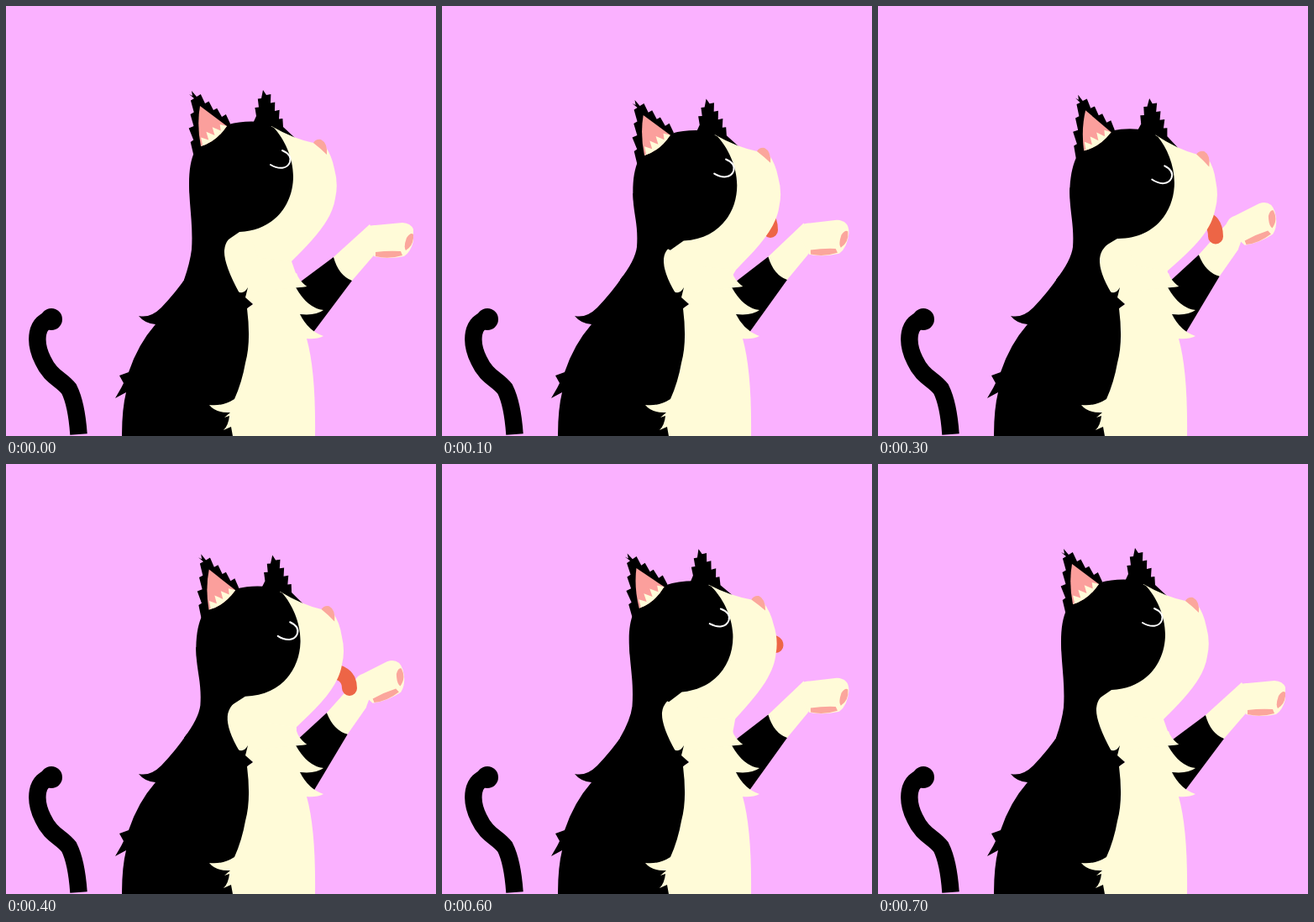
Write an HTML page that moves like this. It is 512x512 px and loops after 800 ms.

```html
<!DOCTYPE html>
<html lang="en">
<head>
<meta charset="utf-8">
<title>Cat licking its paw</title>
<style>
  html, body { margin: 0; width: 100%; height: 100%; overflow: hidden; background: #fab1ff; }
  svg { display: block; width: 100%; height: 100%; }
  .cream { fill: #fffbd8; }
  .pink { fill: #fba69c; }
  .line { fill: none; stroke-linecap: round; }
</style>
</head>
<body>
<svg viewBox="0 0 512 512">
  <defs>
    <clipPath id="edge"><path d="M0,0H485V512H0Z"/></clipPath>
  </defs>
  <rect width="512" height="512" fill="#fab1ff"/>

  <path fill="none" stroke="#000" stroke-width="20.5"
    d="M86.5,510 Q84,474 75,456 C66,444 53,442 44,422 C33,400 35,374 56,373"/>
  <circle cx="54" cy="373" r="13"/>

  <g clip-path="url(#edge)">
    <g id="arm">
      <path d="M338,338 L355,325 390,299 412,327 364,391 340,380Z"/>
      <path class="cream" d="M390,299 L433,260 446,280 437,298 412,327 Q396,321 390,299Z"/>
      <g id="paw">
        <path class="cream" d="M424,270 Q431,260 440,261 L472,258 Q487,259 486,274 Q484,291 474,298 Q456,302 438,298Z"/>
        <path class="pink" d="M440,293 Q455,291 470,292 L472,297 Q455,302 440,298Z"/>
        <path class="pink" d="M477,276 Q482,269 485,272 Q486,285 476,291 Q473,287 477,276Z"/>
      </g>
    </g>
  </g>

  <path d="M138,512 Q138,480 143,460 L130,467 137,455 140,449 135,440 146,436 Q157,403 178,379
    Q165,378 158,369 Q172,372 185,359 Q203,340 215,322 L280,335 300,400 290,512Z"/>
  <path id="neck"/>
  <path class="cream" d="M278,342 L294,355 287,360 Q292,400 285,425 Q281,448 272,468 Q258,477 242,475
    Q250,485 267,484 L260,490 266,488 Q265,499 259,505 L268,501 270,512 H368 Q369,435 358,396
    Q370,397 378,393 Q360,387 350,367 Q369,369 378,362 Q359,360 345,335 L358,334 Q348,326 346,318Z"/>
  <path id="throat" class="cream"/>
  <path d="M276,340 Q283,344 288,335 L285,347 294,355 287,360 278,355Z"/>
  <path id="tongue" class="line" stroke="#ed6546" stroke-width="18"/>

  <g id="head">
    <path id="farEar"/>
    <path class="cream" d="M316,143 Q342,158 366,163 L380,167 Q388,178 391,194 Q396,212 392,229
      C388,256 365,279 340,304 L300,300 280,240Z"/>
    <path class="pink" d="M366,163 Q369,158 375,159 Q383,163 382,177 Q375,170 366,163Z"/>
    <path d="M218,212 C218,195 220,183 225,172 Q239,148 265,141 Q282,136 305,138 L319,145
      C331,158 342,180 342,203 C342,235 321,267 278,269 L262,280 240,268 225,245 Q218,228 218,212Z"/>
    <path id="nearEar"/>
    <path fill="#fb9f9c" d="M231,119 L263,143 Q250,162 232,167 Q227,142 231,119Z"/>
    <path id="earTuft" class="cream"/>
    <path id="eye" class="line" stroke="#fff" stroke-width="2"
      d="M315,189 C325,195 335,194 338,186 C340,180 336,175 329,172"/>
  </g>
</svg>
<script>
  const STEP = 100, FRAMES = 8;
  const CENTER = [290, 205];
  const $ = id => document.getElementById(id);
  const set = (id, name, value) => $(id).setAttribute(name, value);

  let seed = 7;
  const random = () => (seed = seed * 16807 % 2147483647) / 2147483647;

  // Jagged edge from a to b; spikes stand on the left and lean along the edge
  function fur([ax, ay], [bx, by], count, height, lean) {
    const dx = bx - ax, dy = by - ay, len = Math.hypot(dx, dy);
    const at = (t, h) => [ax + dx * t + dy / len * h, ay + dy * t - dx / len * h];
    let path = `L${ax},${ay}`;
    for (let i = 0; i < count; i++) {
      const h = height * (.7 + .5 * random());
      path += ` L${at((i + lean) / count, h)} ${at((i + 1) / count, 0)}`;
    }
    return path;
  }

  set('nearEar', 'd', 'M225,180 ' + fur([223, 176], [224, 110], 4, 5, .85) +
    'L218,105 222,107 221,101 ' + fur([227, 108], [267, 140], 4, 5, .15) + 'L262,152 240,178Z');
  set('farEar', 'd', 'M292,144 ' + fur([298, 131], [304, 110], 2, 4, .85) +
    'L306,100 ' + fur([310, 106], [330, 144], 4, 5, .15) + 'L344,157 320,162 295,150Z');
  set('earTuft', 'd', 'M232,167 ' + fur([234, 165], [263, 143], 4, 9, .4) + 'Q250,162 232,167Z');

  // Key poses: step, head shift and turn, tongue root height and tip
  const keys = [
    { at: 0, dx: 0, dy: 0, turn: 0, root: 214, tipX: 376, tipY: 215 },
    { at: 1, dx: 9.3, dy: 10.5, turn: -.4, root: 250, tipX: 391, tipY: 267 },
    { at: 2, dx: 13, dy: 9.5, turn: 5.5, root: 258, tipX: 395, tipY: 282 },
    { at: 4, dx: 8.5, dy: 8, turn: 1.5, root: 246, tipX: 409, tipY: 267 },
    { at: 5, dx: 9, dy: 4, turn: -5.5, root: 207, tipX: 419, tipY: 217 }
  ];
  keys.push({ ...keys[0], at: 7 });

  function poseAt(step) {
    const i = keys.findIndex(key => key.at >= step);
    const b = keys[i], a = keys[Math.max(0, i - 1)];
    const t = a === b ? 0 : (step - a.at) / (b.at - a.at);
    return Object.fromEntries(Object.keys(a).map(k => [k, a[k] + (b[k] - a[k]) * t]));
  }

  function draw(time) {
    const step = Math.floor(time / STEP) % FRAMES;
    const { dx, dy, turn, root, tipX, tipY } = poseAt(step);
    const raise = Math.sin(Math.PI * step / (FRAMES - 1)) ** 2;
    const lean = Math.min(1, dx / 9);
    const rad = turn * Math.PI / 180;

    // Stage position of a point fixed to the head
    const onHead = (x, y) => {
      const u = x - CENTER[0], v = y - CENTER[1];
      return [
        CENTER[0] + dx + u * Math.cos(rad) - v * Math.sin(rad),
        CENTER[1] + dy + u * Math.sin(rad) + v * Math.cos(rad)
      ];
    };

    set('head', 'transform', `translate(${dx} ${dy}) rotate(${turn} ${CENTER})`);
    set('eye', 'transform', `translate(0 ${8 * raise ** 2})`);
    set('arm', 'transform', `rotate(${-6.3 * raise} 360 375)`);
    set('paw', 'transform',
      `translate(${3 * raise} ${-4 * raise}) rotate(${-18 * raise ** 3} 437 280)`);

    const nx = 221 + 11 * lean, ny = 290 - 3 * lean;
    set('neck', 'd',
      `M${onHead(218, 212)} C${onHead(218, 236)} ${nx + 2},${ny - 28} ${nx},${ny}
       Q${nx - 2},${ny + 16} 212,326 L284,345 ${onHead(300, 240)}Z`);

    const tx = 260 + 4 * lean, ty = 291 + 10 * lean;
    set('throat', 'd',
      `M${onHead(300, 255)} L${onHead(278, 268)} Q${tx + 1},${ty - 15} ${tx},${ty}
       Q${tx - 1},${ty + 16} 278,342 L350,335 358,334 Q348,327 346,321
       L${onHead(340, 304)} ${onHead(340, 250)}Z`);

    set('tongue', 'd', `M380,${root} Q${tipX},${root} ${tipX},${tipY}`);
  }

  const start = performance.now();
  function tick() {
    draw(performance.now() - start);
    requestAnimationFrame(tick);
  }
  tick();
</script>
</body>
</html>
```
